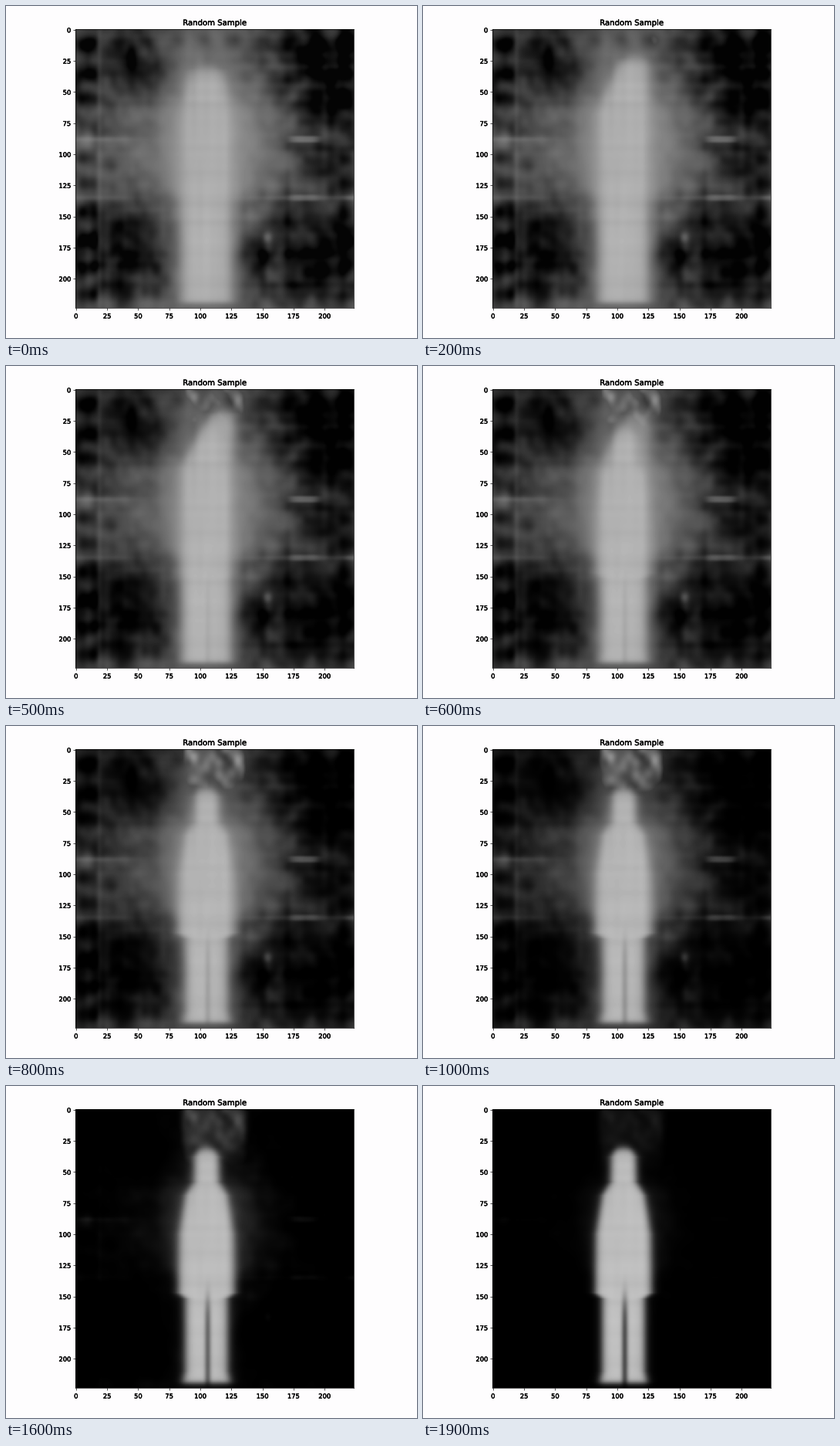
Animation, 533 px wide and 430 px high, one loop 2 s. Source, as a matplotlib script:

```python
import numpy as np
import matplotlib.pyplot as plt
from matplotlib.animation import FuncAnimation
from matplotlib.patheffects import withStroke

W, H, DPI = 533, 430, 100
FRAMES, STEP = 20, 100
N = 224
PT = 72 / DPI  # points per pixel

rng = np.random.default_rng(11)
axis = np.arange(N, dtype=float)
X, Y = np.meshgrid(axis, axis)


def sigmoid(v):
    return 1 / (1 + np.exp(-np.clip(v, -40, 40)))


def smooth(v):
    v = np.clip(v, 0, 1)
    return v * v * (3 - 2 * v)


def spot(x, y, sx, sy, power=2):
    return np.exp(-np.abs((X - x) / sx) ** power - np.abs((Y - y) / sy) ** power)


def band(v, lo, hi, soft):
    return sigmoid((v - lo) / soft) * sigmoid((hi - v) / soft)


def noise(gap, sx, sy):
    """Smooth unit-variance noise built from Gaussian bumps."""
    c = np.arange(-gap, N + gap + 1, gap)
    gx = np.exp(-((axis[:, None] - c) / sx) ** 2)
    gy = np.exp(-((axis[:, None] - c) / sy) ** 2)
    f = gy @ rng.normal(size=(len(c), len(c))) @ gx.T
    return (f - f.mean()) / f.std()


def beat(v):
    """Ten dark blocks along each side of the picture."""
    return .5 + .5 * np.cos(2 * np.pi * (v - 12) / 22.4)


grain = .032 * noise(5, 4.6, 5) + .045 * noise(9, 8, 9)
weave = noise(5, 3, 60) + noise(5, 60, 3)


def backdrop():
    halo = spot(107, 94, 52, 50, 3)
    column = np.exp(-((X - 106) / 33) ** 4)
    b = .20 + .30 * halo + .24 * column
    b += .14 * band(X, -20, 172, 6) * band(Y, 60, 135, 3)
    b += (grain + .016 * weave) * (1 - .65 * np.maximum(halo, column))

    # Dark areas in the corners, from lower left clockwise
    for x, y, r in [(37, 170, 25), (48, 28, 16), (203, 38, 30), (206, 178, 30), (148, 180, 15)]:
        b -= .19 * spot(x, y, r, 1.15 * r)
    # Light streaks on two rows
    for y, amp in [(88, 1), (135, .55)]:
        b += amp * (.28 * spot(184, y, 12, 2.6, 4) + .13 * spot(15, y, 30, 2.2))
    b += .10 * spot(184, 135, 45, 2) + .16 * spot(221, 135, 6, 2.2)
    b += .20 * spot(154, 167, 3.5, 4)

    sides = band(X, 2, 17, 1.2) + .7 * band(X, 212, 222, 1.5)
    b -= .19 * sides * (beat(Y) - .15)
    b -= .15 * beat(X - 2) * np.exp(-((Y - 8) / 7) ** 2)
    b += .05 * np.exp(-((X - 19) / 2) ** 2)
    b += .07 * sigmoid((Y - 217) / 1.5) * (1 - column)
    return .62 * np.tanh(np.clip(b, .015, 1) / .62 * 1.08)


BASE = backdrop()
SHAFT = band(X, 86, 136, 1.6) * np.exp(-(Y / 42) ** 4) * (1 + .17 * noise(5, 4, 5))

# Half the figure's width from head to feet
ROWS = [30, 38, 58, 69, 100, 147, 152, 210, 219]
HALF = [6, 10, 10.5, 17, 22, 22.5, 17, 17, 19]
PERSON = np.interp(axis, ROWS, HALF)[:, None]
MIDDLE = 105
LEGS = sigmoid((Y - 153) / 6)


def shape(half, centre, top, soft):
    d = np.abs(X - centre)
    return sigmoid((half - d) / soft) * sigmoid((Y - top) / soft)


def figure_mask(t, u):
    """A blurred leaning cone that settles into a standing figure."""
    soft = 3 - 1.2 * u
    lean = 13 * np.sin(np.pi * min(t / 900, 1))
    top = 31 - lean
    rise = np.clip((Y - top) / 45, 0, 1)
    half = 11 + 9 * np.sqrt(rise) - .3 * lean * (1 - rise)
    cone = shape(half, MIDDLE + lean * (1 - rise), top, soft)
    person = shape(PERSON, MIDDLE, 31, soft)
    mask = cone + (person - cone) * smooth((t - 400) / 450)
    gap = .6 * u ** 1.2 * LEGS * np.exp(-((X - 106) / 2.6) ** 2)
    return mask * (1 - gap) * sigmoid((219.5 - Y) / 1.3)


def picture(i):
    t = i * STEP
    u = i / (FRAMES - 1)
    power = 1 + .9 * u + 8 * u ** 4
    back = .7 * (BASE / .7) ** power
    back = np.maximum(back, (.07 + .31 * np.sin(np.pi * u ** .85)) * SHAFT)
    mask = figure_mask(t, u)
    tone = .68 + .065 * u + .015 * LEGS + .006 * weave
    return np.clip(back + (tone - back) * mask, 0, 1)


plt.rcParams["font.family"] = "DejaVu Sans"
fig = plt.figure(figsize=(W / DPI, H / DPI), dpi=DPI, facecolor="#fefdfe")
ax = fig.add_axes([90 / W, 39 / H, 361 / W, 361 / H])
img = ax.imshow(picture(0), cmap="gray", vmin=0, vmax=1, aspect="auto")
title = ax.set_title("Random Sample", fontsize=10.1 * PT, pad=5 * PT)
ticks = range(0, 201, 25)
ax.set_xticks(ticks)
ax.set_yticks(ticks)
ax.tick_params(labelsize=8.33 * PT, length=2.9 * PT, width=.67 * PT, pad=2.9 * PT)
ax.tick_params(axis="x", pad=3.6 * PT)
for label in [title, *ax.get_xticklabels(), *ax.get_yticklabels()]:
    label.set_path_effects([withStroke(linewidth=.45 * PT, foreground="black")])
for spine in ax.spines.values():
    spine.set_linewidth(.67 * PT)


def update(i):
    img.set_data(picture(i))
    return [img]


anim = FuncAnimation(fig, update, frames=FRAMES, interval=STEP, repeat=True)
plt.show()
```
